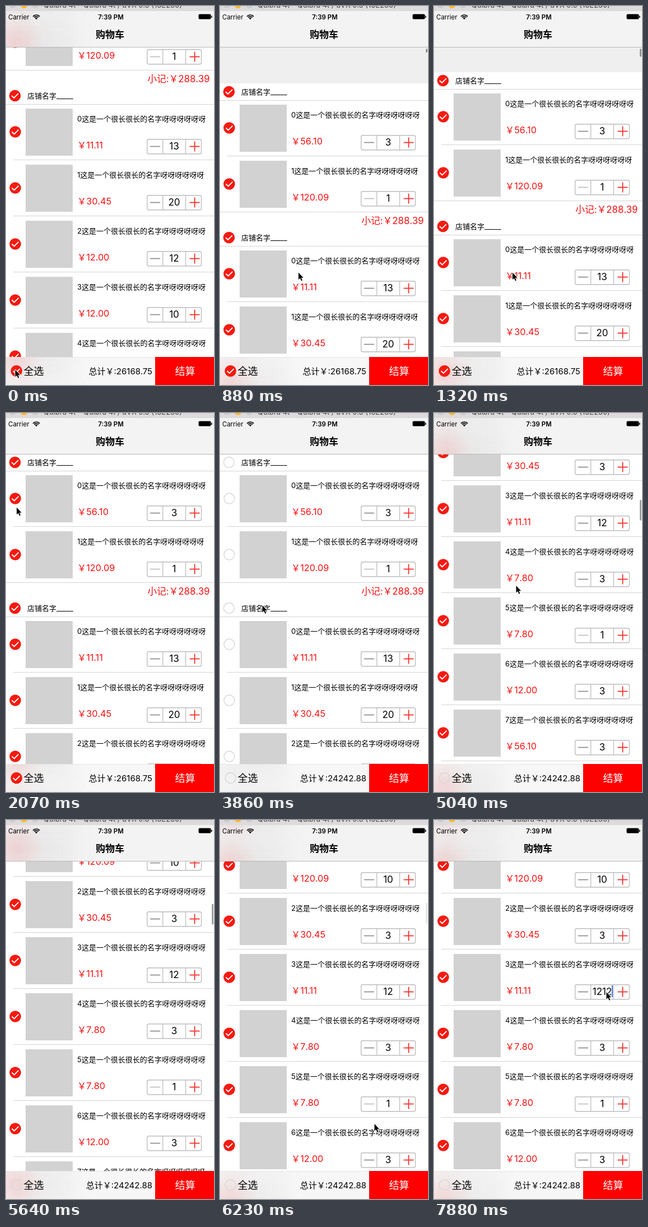
An HTML page with a canvas for the animation above (8 s loop, 371 by 676 pixels).

```html
<!DOCTYPE html>
<html lang="zh">
<head>
<meta charset="utf-8">
<title>购物车</title>
<style>
html, body { margin: 0; width: 371px; height: 676px; overflow: hidden; background: #fff; }
canvas { display: block; }
</style>
</head>
<body>
<canvas id="stage" width="371" height="676"></canvas>
<script>
const ctx = document.getElementById('stage').getContext('2d');
const W = 371, H = 676, LOOP = 8000;
const TOP = 73, BOTTOM = 626, ROW = 100, BAND = 30;
const FACE = 'Inter, "Noto Sans CJK SC", "Noto Sans CJK", sans-serif';
const RED = '#fa1010';

// Each item is [price, quantity]; offAt is when the shop is deselected.
const shops = [
  { sum: '288.39', offAt: 2520, items: [['56.10', 3], ['120.09', 1]] },
  { sum: '1637.48', offAt: 3260, items: [['11.11', 13], ['30.45', 20], ['12.00', 12],
    ['12.00', 10], ['56.10', 10], ['7.80', 3]] },
  { sum: '3560.25', offAt: Infinity, items: [['56.10', 3], ['120.09', 10], ['30.45', 3],
    ['11.11', 12], ['7.80', 3], ['7.80', 1], ['12.00', 3], ['56.10', 3],
    ['12.00', 2], ['7.80', 4], ['11.11', 3]] }
];

// Keys: [time, value, ...]
const scrollKeys = [[0, 188], [480, 188], [880, -65], [1150, -65], [1620, 0], [4080, 0],
  [4300, 240], [4520, 420], [4760, 860], [5040, 1202], [5180, 1210], [5640, 1122], [5920, 1092]];
const mouseKeys = [[0, 16, 648], [130, 16, 648], [460, 132, 250], [820, 139.5, 474.5],
  [1320, 139.5, 474.5], [2070, 18.5, 167.5], [2360, 16, 85], [2600, 16, 85], [3120, 15, 345],
  [3400, 15, 345], [3860, 75, 342], [4080, 150, 500], [4300, 150, 260], [4520, 150, 500],
  [4760, 147, 310], [5040, 146, 307], [5450, 175, 690], [5920, 250, 690],
  [6650, 314, 308], [7260, 314, 308], [7600, 307, 306]];

function at(keys, t) {
  let i = keys.findIndex(k => k[0] > t);
  if (i < 0) i = keys.length;
  const a = keys[i - 1], b = keys[i];
  if (!b) return a.slice(1);
  const p = (t - a[0]) / (b[0] - a[0]), e = p * p * (3 - 2 * p);
  return a.slice(1).map((v, n) => v + (b[n + 1] - v) * e);
}

function rect(x, y, w, h, color) {
  ctx.fillStyle = color;
  ctx.fillRect(x, y, w, h);
}

function disc(x, y, r, color) {
  ctx.fillStyle = color;
  ctx.beginPath();
  ctx.arc(x, y, r, 0, Math.PI * 2);
  ctx.fill();
}

function line(points, color, width) {
  ctx.strokeStyle = color;
  ctx.lineWidth = width;
  ctx.beginPath();
  points.forEach(([x, y]) => ctx.lineTo(x, y));
  ctx.stroke();
}

function text(s, x, y, size, color = '#000', align = 'left', weight = 400) {
  ctx.font = `${weight} ${size}px ${FACE}`;
  ctx.textAlign = align;
  ctx.fillStyle = color;
  ctx.fillText(s, x, y);
  return ctx.measureText(s).width;
}

function clipped(x, y, w, h, draw) {
  ctx.save();
  ctx.beginPath();
  ctx.rect(x, y, w, h);
  ctx.clip();
  draw();
  ctx.restore();
}

function check(x, y, on) {
  if (on) {
    disc(x, y, 10.3, '#f51a10');
    line([[x - 6, y], [x - 1.8, y + 4], [x + 6, y - 3.8]], '#fff', 1.8);
  } else {
    ctx.strokeStyle = '#d9d9d9';
    ctx.lineWidth = 1.5;
    ctx.beginPath();
    ctx.arc(x, y, 9.4, 0, Math.PI * 2);
    ctx.stroke();
  }
}

function stepper(y, qty, caret) {
  ctx.strokeStyle = '#bdbdbd';
  ctx.lineWidth = 1.4;
  ctx.beginPath();
  ctx.roundRect(251.7, y + .7, 96.8, 26, 3);
  ctx.stroke();
  [279.7, 320.5].forEach(x => line([[x, y + 1], [x, y + 26]], '#bdbdbd', 1.3));
  const m = y + 13.5;
  line([[257, m], [275, m]], qty === 1 ? '#bfbfbf' : '#8c8c8c', 1.7);
  line([[327.5, m], [345.5, m]], '#f5302a', 1.8);
  line([[336.5, m - 9], [336.5, m + 9]], '#f5302a', 1.8);
  const w = text(qty, 300, y + 19, 17, '#000', 'center');
  if (caret) rect(Math.round(300 + w / 2), y + 2, 2, 21, '#4a6ee0');
}

function item(y, n, [price, qty], on, last, caret) {
  check(16.5, y + 49.5, on);
  rect(35, y + 8, 84, 84, '#d2d2d2');
  text(n + '这是一个很长很长的名字呀呀呀呀呀呀', 127, y + 31, 13);
  text('￥' + price, 127, y + 79, 16.2, RED);
  stepper(y + 62, qty, caret);
  const x = last ? 0 : 13;
  rect(x, y + 99, W - x, 1, '#d4d4d4');
}

// Draws the list and returns what may shine through the bars.
function list(t, scroll) {
  const rows = [];
  let y = TOP - scroll;
  rect(0, TOP, W, BOTTOM - TOP, '#fff');
  if (y > TOP) rect(0, TOP, W, y - TOP, '#efefef');
  shops.forEach((shop, s) => {
    const on = t < shop.offAt;
    check(16, y + 15, on);
    text('店铺名字_____', 38, y + 20, 13);
    rect(0, y + BAND, W, 1, '#d4d4d4');
    y += BAND;
    shop.items.forEach((it, n) => {
      if (y > -ROW && y < H + ROW) {
        const edited = s === 2 && n === 3;
        const qty = edited && t >= 7700 ? 1212 : edited && t >= 7430 ? 121 : it[1];
        item(y, n, [it[0], qty], on, n === shop.items.length - 1, edited && t >= 6950);
        rows.push([y, on]);
      }
      y += ROW;
    });
    text('小记:￥' + shop.sum, 363.5, y + 21, 16.8, RED, 'right');
    y += BAND;
  });
  return rows;
}

// Blurred rows seen through a translucent bar.
function glow(rows) {
  ctx.filter = 'blur(18px)';
  rows.forEach(([y, on]) => {
    rect(0, y + 8, 119, 84, 'rgba(130,130,130,.07)');
    if (on) disc(16, y + 50, 32, 'rgba(255,50,50,.15)');
  });
  ctx.filter = 'none';
}

function indicator(t, scroll) {
  const fade = (a, b) => Math.max(0, Math.min(1, (t - a) / 150, (b - t) / 250));
  const alpha = Math.max(fade(420, 1800), fade(4080, 6300));
  if (!alpha) return;
  const h = Math.max(7, 37 + Math.min(0, scroll) * .5);
  ctx.fillStyle = `rgba(0,0,0,${.38 * alpha})`;
  ctx.beginPath();
  ctx.roundRect(367, 76 + Math.max(0, scroll) * .0656, 3, h, 1.5);
  ctx.fill();
}

function windowBar() {
  rect(0, 0, W, 9, '#dcdadc');
  disc(12, -2, 6, '#cfc9ca');
  disc(32, -2, 6, '#fcb828');
  disc(52, -2, 6, '#cbcbcb');
  text('Quibra 4t – Quibra 4t / uVX 9.3 (13E230)', 67, 3, 13, '#444');
}

function wifi(x, y) {
  ctx.strokeStyle = '#000';
  ctx.lineWidth = 1.7;
  [8, 5.2].forEach(r => {
    ctx.beginPath();
    ctx.arc(x, y, r, -Math.PI * .77, -Math.PI * .23);
    ctx.stroke();
  });
  ctx.fillStyle = '#000';
  ctx.beginPath();
  ctx.moveTo(x, y);
  ctx.arc(x, y, 3, -Math.PI * .77, -Math.PI * .23);
  ctx.fill();
}

function battery() {
  ctx.fillStyle = '#000';
  ctx.beginPath();
  ctx.roundRect(343.5, 14.5, 22, 9, 2);
  ctx.fill();
  rect(366, 17.5, 1.5, 3.5, '#000');
}

function navBar(rows) {
  clipped(0, 9, W, TOP - 9, () => {
    rect(0, 9, W, TOP - 9, '#f3f3f3');
    glow(rows);
  });
  rect(0, TOP, W, 1, '#b8b8b8');
  text('Carrier', 4, 23.5, 11.5);
  wifi(54, 24);
  text('7:39 PM', 187, 23.5, 11.5, '#000', 'center', 600);
  battery();
  text('购物车', 185.5, 57, 17, '#000', 'center', 700);
}

function bottomBar(t, rows) {
  clipped(0, BOTTOM, 266, H - BOTTOM, () => {
    rect(0, BOTTOM, 266, H - BOTTOM, '#f7f7f7');
    glow(rows);
  });
  rect(0, BOTTOM, 266, 1, '#e6e6e6');
  rect(266, BOTTOM, W - 266, H - BOTTOM, '#ff0000');
  check(18.7, 651, t < shops[0].offAt);
  text('全选', 31.5, 657.5, 18);
  const total = t < shops[0].offAt ? '26168.75' : t < shops[1].offAt ? '25880.36' : '24242.88';
  text('总计￥:' + total, 261, 656.5, 15, '#000', 'right');
  text('结算', 319.5, 657.5, 18, '#fff', 'center');
}

function pointer(x, y) {
  const shape = [[.5, 1], [.5, 13.5], [3.3, 10.9], [5.5, 15.8], [7.4, 15], [5.3, 10.2], [9.2, 10.2]];
  ctx.beginPath();
  shape.forEach(([dx, dy]) => ctx.lineTo(x + dx, y + dy));
  ctx.closePath();
  ctx.lineJoin = 'round';
  ctx.strokeStyle = '#fff';
  ctx.lineWidth = 2;
  ctx.stroke();
  ctx.fillStyle = '#000';
  ctx.fill();
  ctx.lineJoin = 'miter';
}

function draw(now) {
  const t = now % LOOP;
  const scroll = Math.round(at(scrollKeys, t)[0]);
  let rows;
  clipped(0, TOP, W, BOTTOM - TOP, () => {
    rows = list(t, scroll);
    indicator(t, scroll);
  });
  windowBar();
  navBar(rows);
  bottomBar(t, rows);
  pointer(...at(mouseKeys, t));
}

const start = performance.now();
function tick() {
  draw(performance.now() - start);
  requestAnimationFrame(tick);
}
tick();
</script>
</body>
</html>
```
